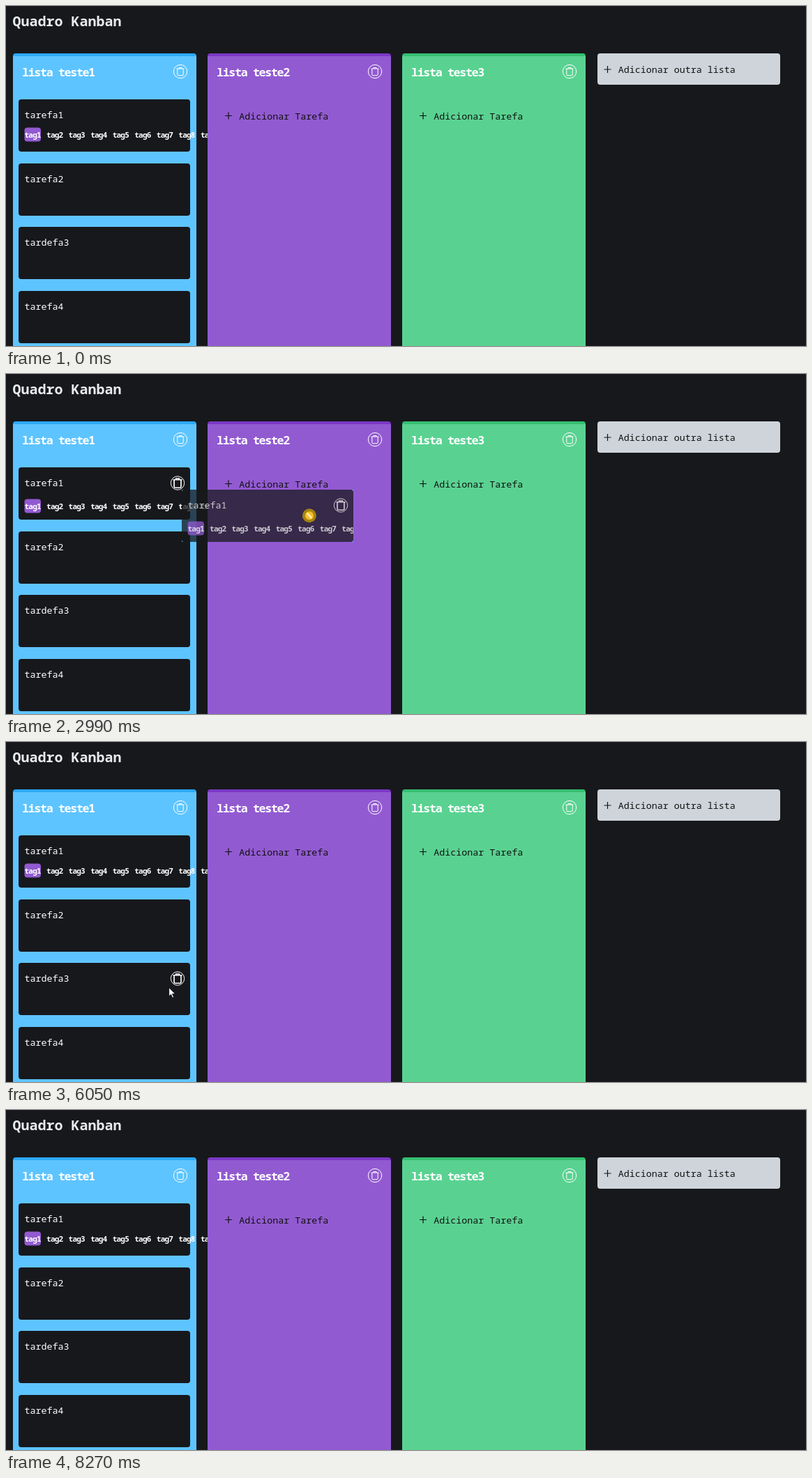
An HTML page with a canvas that plays this animation: 1147 by 488 pixels, repeating every 9.45 s.

```html
<!DOCTYPE html>
<html lang="pt">
<head>
<meta charset="utf-8">
<title>Quadro Kanban</title>
<style>
html, body { margin: 0; width: 100%; height: 100%; overflow: hidden; background: #17181c; }
canvas { display: block; }
</style>
</head>
<body>
<canvas id="board" width="1147" height="488"></canvas>
<script>
const ctx = document.getElementById('board').getContext('2d');
const FONT = '"Roboto Mono", "Noto Sans Mono", "DejaVu Sans Mono", monospace';
const LOOP = 9450, TICK = 1000 / 15, ENTER = 990, LEAVE = 8270;
const DARK = '#17181c', BLUE = '#5ec4ff', PURPLE = '#925ad1';
const COLUMN = { x: 10, y: 68, w: 263, step: 279.2 };
const CARD = { x: 18, y: 134, w: 246, h: 75, step: 91.6 };
const tasks = ['tarefa1', 'tarefa2', 'tardefa3', 'tarefa4'];
const lists = [
  { fill: BLUE, bar: '#2ba9f8' },
  { fill: PURPLE, bar: '#7b38c6' },
  { fill: '#59d291', bar: '#35c073' }
];

// Each drag carries its card by `shift` between start and end, until the drop
const drags = [
  { start: 2040, end: 3280, drop: 3240, grab: [201, 171], shift: [268, 37], bend: 1 },
  { start: 4220, end: 5300, drop: 5365, grab: [173, 248], shift: [296, -51], bend: 2 },
  { start: 6110, end: 6769, drop: 7200, grab: [233, 352], shift: [550, -99], bend: 1 }
];
const PRESS = -30, LIFT = 100;

const legs = [];
let spot = [1012, 475], free = ENTER;
function travel(start, end, to, bend = 1) {
  legs.push({ start, end, from: spot, to, bend });
  spot = to;
}
for (const d of drags) {
  travel(free, d.start + PRESS, d.grab);
  travel(d.start, d.end, d.grab.map((v, i) => v + d.shift[i]), d.bend);
  free = d.drop;
}
travel(free, 7850, [186, 365]);
travel(7850, 8200, [453, 446]);

const ease = u => u * u * (3 - 2 * u);

function pointer(t) {
  const leg = legs.findLast(l => l.start <= t) ?? legs[0];
  const e = ease(Math.min(1, Math.max(0, (t - leg.start) / (leg.end - leg.start))));
  const mix = (i, k) => leg.from[i] + (leg.to[i] - leg.from[i]) * k;
  return { x: mix(0, e), y: mix(1, e ** leg.bend) };
}

const cardTop = i => Math.round(CARD.y + i * CARD.step);

function box(x, y, w, h, r, fill) {
  ctx.beginPath();
  ctx.roundRect(x, y, w, h, r);
  ctx.fillStyle = fill;
  ctx.fill();
}

function disc(x, y, r, fill) {
  ctx.beginPath();
  ctx.arc(x, y, r, 0, 7);
  ctx.fillStyle = fill;
  ctx.fill();
}

function text(s, x, y, size, fill, weight = 500, spacing = 0) {
  ctx.font = `${weight} ${size}px ${FONT}`;
  ctx.letterSpacing = spacing + 'px';
  ctx.fillStyle = fill;
  ctx.fillText(s, x, y);
}

function stroke(d, x, y, width, color, scale = 1) {
  ctx.save();
  ctx.translate(x, y);
  ctx.scale(scale, scale);
  ctx.lineWidth = width;
  ctx.strokeStyle = color;
  ctx.stroke(new Path2D(d));
  ctx.restore();
}

function trash(x, y, width, scale) {
  ctx.beginPath();
  ctx.arc(x, y, 9.7, 0, 7);
  ctx.lineWidth = 1;
  ctx.strokeStyle = '#fff';
  ctx.stroke();
  stroke('M-5.5 -4H5.5M-2 -4V-5.5H2V-4M-4.2 -4V4.5Q-4.2 5.7 -3 5.7H3Q4.2 5.7 4.2 4.5V-4', x, y, width, '#fff', scale);
}

function addLabel(label, x, y) {
  stroke('M-5 0H5M0 -5V5', x, y, 1.2, '#111');
  text(label, x + 15.3, y + 5, 13.333, '#111', 400);
}

function card(i, x, y, hover) {
  box(x, y, CARD.w, CARD.h, 4, DARK);
  text(tasks[i], x + 8.5, y + 27, 13.333, '#fff');
  if (i === 0) {
    const ty = y + (hover ? 55.5 : 50.5);
    box(x + 8.5, ty - 10, 23.5, 20, 4, PURPLE);
    for (let n = 0; n < 9; n++)
      text('tag' + (n + 1), x + 8.5 + n * 31.55, ty + 4, 11, '#fff', 700, -0.77);
  }
  if (hover) trash(x + 228, y + 22.5, 1.4, 1.18);
}

// A see-through copy of the card that keeps the list colour in its corners
function ghost(i, p) {
  const { grab } = drags[i];
  const x = Math.round(CARD.x + p.x - grab[0]);
  const y = Math.round(cardTop(i) + p.y - grab[1]);
  ctx.save();
  ctx.globalAlpha = 0.75;
  ctx.beginPath();
  ctx.rect(x, y, CARD.w, CARD.h);
  ctx.clip();
  ctx.roundRect(x, y, CARD.w, CARD.h, 4);
  ctx.fillStyle = BLUE;
  ctx.fill('evenodd');
  card(i, x, y, true);
  ctx.restore();
}

function board(hover) {
  ctx.fillStyle = DARK;
  ctx.fillRect(0, 0, 1147, 488);
  text('Quadro Kanban', 9.5, 28.5, 20, '#e9ecef', 700);

  lists.forEach(({ fill, bar }, i) => {
    const x = Math.round(COLUMN.x + i * COLUMN.step);
    box(x, COLUMN.y, COLUMN.w, 430, 4, bar);
    box(x, COLUMN.y + 4, COLUMN.w, 430, 0, fill);
    text('lista teste' + (i + 1), x + 13, 100.5, 16.667, '#fff', 700, -1.333);
    trash(x + 240, 94, 1);
    if (i) addLabel('Adicionar Tarefa', x + 30, 157.5);
    else tasks.forEach((_, n) => card(n, CARD.x, cardTop(n), n === hover));
  });

  box(848, COLUMN.y, 262, 45, 4, '#ced4da');
  addLabel('Adicionar outra lista', 862.5, 91);
}

function arrow(p) {
  const shape = 'M.5 .5V13L3.4 10.4L5.5 15.3L7.5 14.4L5.4 9.7H9.5Z';
  ctx.save();
  ctx.translate(p.x, p.y);
  ctx.fillStyle = '#fff';
  ctx.fill(new Path2D(shape));
  ctx.restore();
  stroke(shape, p.x, p.y, 0.8, '#000');
}

function denied(p) {
  disc(p.x, p.y, 10, 'rgba(180,145,10,.88)');
  disc(p.x, p.y, 6, '#f6bd2c');
  stroke('M-3.6 -3.6L3.6 3.6', p.x, p.y, 2.6, '#fff2ae');
}

function cardAt(p) {
  if (p.x < CARD.x || p.x > CARD.x + CARD.w) return -1;
  return tasks.findIndex((_, i) => p.y >= cardTop(i) && p.y <= cardTop(i) + CARD.h);
}

function draw(now) {
  const real = now % LOOP;
  if (real < ENTER || real >= LEAVE) return board(-1);

  const t = ENTER + TICK * (Math.floor((real - ENTER) / TICK + 0.2) + 0.2);
  const p = pointer(t);
  const held = drags.findIndex(d => t >= d.start + PRESS && t < d.drop);

  board(held < 0 ? cardAt(p) : held);
  if (held >= 0 && t >= drags[held].start + LIFT) {
    ghost(held, p);
    denied(p);
  } else {
    if (held >= 0) disc(p.x, p.y, 8, 'rgba(255,200,0,.62)');
    arrow(p);
  }
}

let begin;
function loop(now) {
  begin ??= now;
  draw(now - begin);
  requestAnimationFrame(loop);
}
draw(0);
requestAnimationFrame(loop);
</script>
</body>
</html>
```
